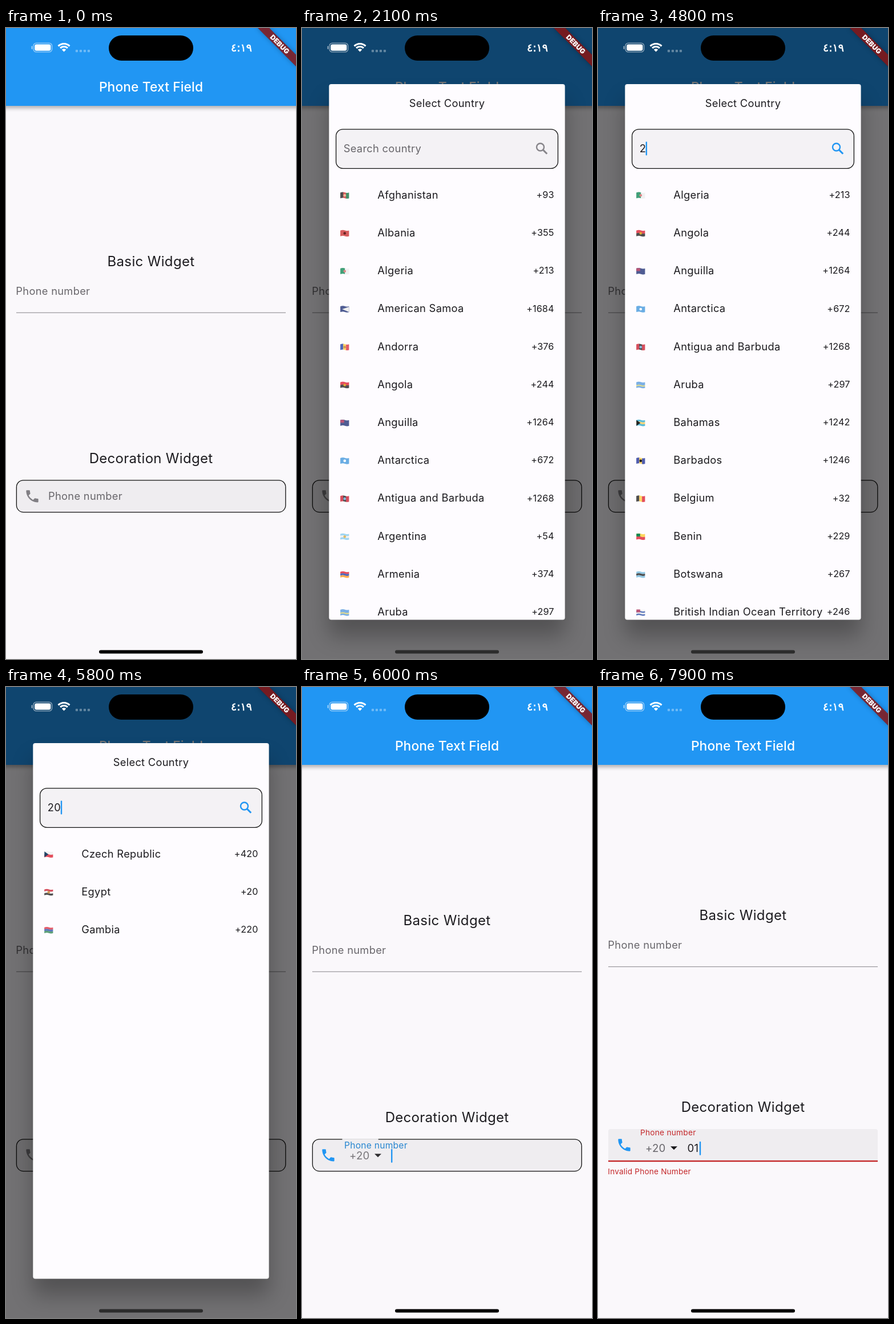
These frames come from a looping animation (508 px wide and 1102 px high, 8000 ms). An HTML page with a canvas:

```html
<!DOCTYPE html>
<html lang="en">
<head>
<meta charset="utf-8">
<title>Phone Text Field</title>
<style>
  html, body { margin: 0; width: 508px; height: 1102px; overflow: hidden; }
  canvas { display: block; }
</style>
</head>
<body>
<canvas id="stage" width="508" height="1102"></canvas>
<script>
const ctx = document.getElementById('stage').getContext('2d');
const W = 508, H = 1102, LOOP = 8000, TICK = 100;
const BLUE = '#2196f3', INK = '#1c1b1f', GREY = '#68666b', RED = '#c4282b';
const PAPER = '#faf8fb', FILL = '#efedf0';
const BODY = 18.3;

// When things happen, in ms
const FOCUS = 500, OPEN = 2100, SEARCH = 3100, KEY_2 = 4600, KEY_20 = 5300,
      CLOSE = 5900, REFOCUS = 5926, KEY_0 = 7300, KEY_01 = 7700;

// name, dial code, flag: stripe direction, colours, then o disc / c canton / < > triangle
const COUNTRIES = [
  ['Afghanistan', '93', 'v #222 #c33 #174 o#eb9'],
  ['Albania', '355', 'h #c33 o#622'],
  ['Algeria', '213', 'v #185 #eee o#d88'],
  ['American Samoa', '1684', 'h #237 >#eee'],
  ['Andorra', '376', 'v #24a #fc4 #d34 o#c95'],
  ['Angola', '244', 'h #d23 #222 o#da3'],
  ['Anguilla', '1264', 'h #237 c#b57'],
  ['Antarctica', '672', 'h #49d o#fff'],
  ['Antigua and Barbuda', '1268', 'v #c23 #222 #c23 o#8bd'],
  ['Argentina', '54', 'h #8ce #eee #8ce o#db6'],
  ['Armenia', '374', 'h #d23 #24a #f92'],
  ['Aruba', '297', 'h #59d #59d #cc7 #59d'],
  ['Bahamas', '1242', 'h #3ac #fc5 #3ac <#222'],
  ['Barbados', '1246', 'v #239 #fc4 #239 o#222'],
  ['Belgium', '32', 'v #222 #fc4 #d23'],
  ['Benin', '229', 'h #fc3 #d23 c#185'],
  ['Botswana', '267', 'h #7bd #222 #7bd'],
  ['British Indian Ocean Territory', '246', 'h #eee #35a #eee #35a c#b57'],
  ['Czech Republic', '420', 'h #eee #d23 <#246'],
  ['Egypt', '20', 'h #c23 #eee #222 o#c95'],
  ['Gambia', '220', 'h #d34 #35a #385']
];

const PHONE = new Path2D('M6.62 10.79c1.44 2.83 3.76 5.14 6.59 6.59l2.2-2.2c.27-.27.67-.36 1.02-.24 1.12.37 2.33.57 3.57.57.55 0 1 .45 1 1V20c0 .55-.45 1-1 1-9.39 0-17-7.61-17-17 0-.55.45-1 1-1h3.5c.55 0 1 .45 1 1 0 1.25.2 2.45.57 3.57.11.35.03.74-.25 1.02z');

const clamp = v => Math.max(0, Math.min(1, v));
const lerp = (a, b, p) => a + (b - a) * p;
const smooth = v => { const p = clamp(v); return p * p * (3 - 2 * p); };

// y is the middle of the capitals
function text(str, x, y, { size = BODY, color = INK, align = 'left', weight = 400, gap = 0.3 } = {}) {
  ctx.font = `${weight} ${size}px Inter, sans-serif`;
  ctx.letterSpacing = gap + 'px';
  ctx.textAlign = align;
  ctx.fillStyle = color;
  ctx.fillText(str, x, y + size * 0.36);
}

function box(x, y, w, h, r, fill, stroke) {
  ctx.beginPath();
  ctx.roundRect(x, y, w, h, r);
  if (fill) { ctx.fillStyle = fill; ctx.fill(); }
  if (stroke) { ctx.strokeStyle = stroke; ctx.lineWidth = 1.3; ctx.stroke(); }
}

function rect(x, y, w, h, fill) {
  ctx.fillStyle = fill;
  ctx.fillRect(x, y, w, h);
}

function polygon(color, ...points) {
  ctx.beginPath();
  points.forEach(([x, y]) => ctx.lineTo(x, y));
  ctx.fillStyle = color;
  ctx.fill();
}

function disc(x, y, r, color) {
  ctx.beginPath();
  ctx.arc(x, y, r, 0, 2 * Math.PI);
  ctx.fillStyle = color;
  ctx.fill();
}

function layer(alpha, draw) {
  ctx.save();
  ctx.globalAlpha *= alpha;
  draw();
  ctx.restore();
}

function withShadow(color, blur, dy, draw) {
  ctx.save();
  ctx.shadowColor = color;
  ctx.shadowBlur = blur;
  ctx.shadowOffsetY = dy;
  draw();
  ctx.restore();
}

// Shadow offset and softness grow with the height above the page
const raised = (height, draw) =>
  withShadow('rgba(0,0,0,.28)', height * 1.57, height * 1.18, draw);

// Cursor opacity: half a second on, half a second off, with soft edges
function blink(elapsed) {
  const phase = elapsed % 1000;
  if (phase < 500) return 1;
  return phase < 850 ? 1 - smooth((phase - 500) / 200) : smooth((phase - 850) / 150);
}

function cursor(x, y, elapsed) {
  layer(blink(elapsed), () => box(x - 1.2, y - 12, 2.4, 24, 1, BLUE));
}

function appBar() {
  raised(4, () => rect(-10, -10, W + 20, 146, BLUE));
  text('Phone Text Field', 254, 103, { size: 22.8, color: '#fff', align: 'center', weight: 500, gap: 0.1 });
}

function basicField(shift) {
  text('Basic Widget', 254, 407 - shift, { size: 24, align: 'center', gap: 0.35 });
  text('Phone number', 17.3, 459 - shift, { color: GREY });
  rect(18, 496.6 - shift, 472, 1.2, '#98979b');
}

function phoneIcon(y, color) {
  ctx.save();
  ctx.translate(46 - 14.2, y - 14.2);
  ctx.scale(1.183, 1.183);
  ctx.fillStyle = color;
  ctx.fill(PHONE);
  ctx.restore();
}

function decorationField(t) {
  const unfocused = t < FOCUS || (t >= OPEN && t < REFOCUS);
  const p = unfocused ? 0 : smooth((t - (t < OPEN ? 450 : REFOCUS)) / 132);
  const error = t >= KEY_0;
  const top = error ? 772 : 789.8, mid = top + 28;
  const code = t < CLOSE ? '+971' : '+20';
  const textY = error ? 805 : 818;

  text('Decoration Widget', 254, error ? 733.5 : 751, { size: 24, align: 'center' });
  if (error) {
    box(18, top, 472, 56, [4, 4, 0, 0], FILL);
    rect(18, 826.8, 472, 2.4, RED);
    layer(smooth((t - KEY_0 + 60) / 200), () =>
      text('Invalid Phone Number', 17.3, 846, { size: 13.6, color: RED, gap: 0.2 }));
  } else {
    box(18.4, top, 471.4, 55.8, 12, FILL, '#111');
    if (p) {
      rect(70.5, top - 1.5, 107 * p, 1.5, PAPER);
      rect(70.5, top, 107 * p, 1.4, FILL);
    }
  }
  phoneIcon(mid, unfocused ? '#817f84' : BLUE);

  if (p) layer(Math.min(1, p + 0.3), () => {
    const end = code === '+971' ? 148 : 139.5;
    text(code, 83, textY, { color: GREY, size: 18.6 });
    polygon('#161518', [end - 12.5, textY - 2.7], [end - 0.5, textY - 2.7], [end - 6.5, textY + 3.3]);
  });
  const scale = 1 - 0.25 * p;
  text('Phone number', 74, lerp(817, error ? 778 : 789.3, p), {
    size: BODY * scale, gap: 0.3 * scale,
    color: error ? RED : unfocused ? GREY : p < 1 ? '#2786d0' : BLUE
  });

  if (unfocused) return;
  const typed = t >= KEY_01 ? '01' : error ? '0' : '';
  text(typed, 156.5, textY, { size: 18.6 });
  const start = t >= KEY_01 ? KEY_01 : error ? KEY_0 : t >= CLOSE ? CLOSE : FOCUS;
  const x = t < OPEN ? 165.5 : typed ? 157 + 11 * typed.length : 157.2;
  cursor(x, textY + 0.7, t - start);
}

function flag(spec, x, y) {
  const parts = spec.split(' ');
  const upright = parts[0] === 'v';
  const colors = parts.filter(s => s[0] === '#');
  const mark = parts.find(s => /^[oc<>]/.test(s)) || '';
  const n = colors.length, w = 15, h = 10;
  const wave = i => -Math.sin(i * 0.42) * 0.7;
  for (let i = 0; i < w; i++) {
    const top = y - h / 2 + wave(i);
    if (upright) rect(x + i, top, 1, h, colors[Math.floor(i * n / w)]);
    else colors.forEach((c, k) => rect(x + i, top + k * h / n, 1, h / n, c));
  }
  const color = mark.slice(1), up = y - h / 2, low = y + h / 2;
  if (mark[0] === 'o') disc(x + w / 2, y, 2.3, color);
  if (mark[0] === 'c') rect(x, up - 0.3, 6.5, 5, color);
  if (mark[0] === '<') polygon(color, [x, up], [x + 7, y], [x, low]);
  if (mark[0] === '>') polygon(color, [x + w, up + 1], [x + 3, y], [x + w, low]);
}

function searchIcon(color) {
  ctx.strokeStyle = color;
  ctx.lineWidth = 2.4;
  ctx.beginPath();
  ctx.arc(417.5, 208, 6.5, 0, 2 * Math.PI);
  ctx.stroke();
  ctx.lineWidth = 3;
  ctx.beginPath();
  ctx.moveTo(422, 212.6);
  ctx.lineTo(429.2, 219.8);
  ctx.stroke();
}

function dialog(t) {
  const query = t >= KEY_20 ? '20' : t >= KEY_2 ? '2' : '';
  const focused = t >= SEARCH;
  rect(0, 0, W, H, 'rgba(0,0,0,.54)');
  raised(24, () => box(47.3, 98, 413.3, 935.5, 4, '#fefcff'));
  text('Select Country', 254, 131.5, { align: 'center' });
  box(59.6, 176.8, 388.8, 68.5, 12, '#f4f2f5', '#111');
  text(query || 'Search country', 72.7, 210, { color: query ? INK : GREY });
  searchIcon(focused ? BLUE : '#87858a');
  if (focused) {
    const start = t >= KEY_20 ? KEY_20 : t >= KEY_2 ? KEY_2 : SEARCH;
    cursor(73.5 + [0, 11.3, 23.5][query.length], 210.5, t - start);
  }
  ctx.save();
  ctx.beginPath();
  ctx.rect(47.3, 246, 413.3, 787.3);
  ctx.clip();
  COUNTRIES.filter(c => c[1].includes(query)).slice(0, 12).forEach(([name, code, look], i) => {
    const y = 291 + i * 66.23;
    flag(look, 67.3, y + 1.3);
    text(name, 132.3, y);
    text('+' + code, 441.5, y, { size: 16.2, align: 'right', gap: 0.1 });
  });
  ctx.restore();
}

function wifi() {
  const cx = 101.5, cy = 41.5;
  ctx.strokeStyle = '#fff';
  const from = -Math.PI * 0.75, to = -Math.PI * 0.25;
  for (const [r, w] of [[14, 3.2], [9, 3.2], [2.7, 5.2]]) {
    ctx.lineWidth = w;
    ctx.beginPath();
    ctx.arc(cx, cy, r, from, to);
    ctx.stroke();
  }
}

function statusBar(dim) {
  box(180, 13, 148, 44, 22, '#000');
  box(48, 26.3, 32.6, 15.6, 5, null, 'rgba(255,255,255,.55)');
  box(50.2, 28.4, 28.2, 11.4, 3.2, '#fff');
  box(44.6, 31.5, 1.7, 5.5, 1, 'rgba(255,255,255,.6)');
  wifi();
  for (let i = 0; i < 4; i++) box(121.8 + i * 7, 38, 4.2, 4.2, 1, 'rgba(255,255,255,.35)');
  ctx.font = '19px "DejaVu Sans", sans-serif';
  ctx.letterSpacing = '0px';
  ctx.textAlign = 'center';
  ctx.fillStyle = ctx.strokeStyle = '#fff';
  ctx.lineWidth = 0.6;
  ctx.fillText('٤:١٩', 412.5, 41);
  ctx.strokeText('٤:١٩', 412.5, 41);
  const shade = Math.round(44 * dim);
  box(163, 1086.6, 182, 5.9, 2.95, `rgb(${shade},${shade},${shade})`);
}

function debugBanner() {
  ctx.save();
  ctx.translate(W, 0);
  ctx.rotate(Math.PI / 4);
  withShadow('rgba(0,0,0,.55)', 8, 0, () => rect(-48, 33.1, 96, 14.2, 'rgba(0,0,0,.5)'));
  rect(-48, 33.1, 96, 14.2, 'rgba(183,28,28,.627)');
  text('DEBUG', 0, 40.2, { size: 12, color: '#fff', align: 'center', weight: 900, gap: 0 });
  ctx.restore();
}

function draw(t) {
  const open = t < OPEN || t >= CLOSE + TICK ? 0 : t >= CLOSE ? 0.5 : 1;
  rect(0, 0, W, H, PAPER);
  appBar();
  basicField(t >= KEY_0 ? 8.7 : 0);
  decorationField(t);
  if (open) layer(open, () => dialog(t));
  statusBar(open);
  debugBanner();
}

const began = performance.now();
function frame() {
  const t = (performance.now() - began) % LOOP;
  draw(Math.floor(t / TICK) * TICK);
  requestAnimationFrame(frame);
}
frame();
</script>
</body>
</html>
```
